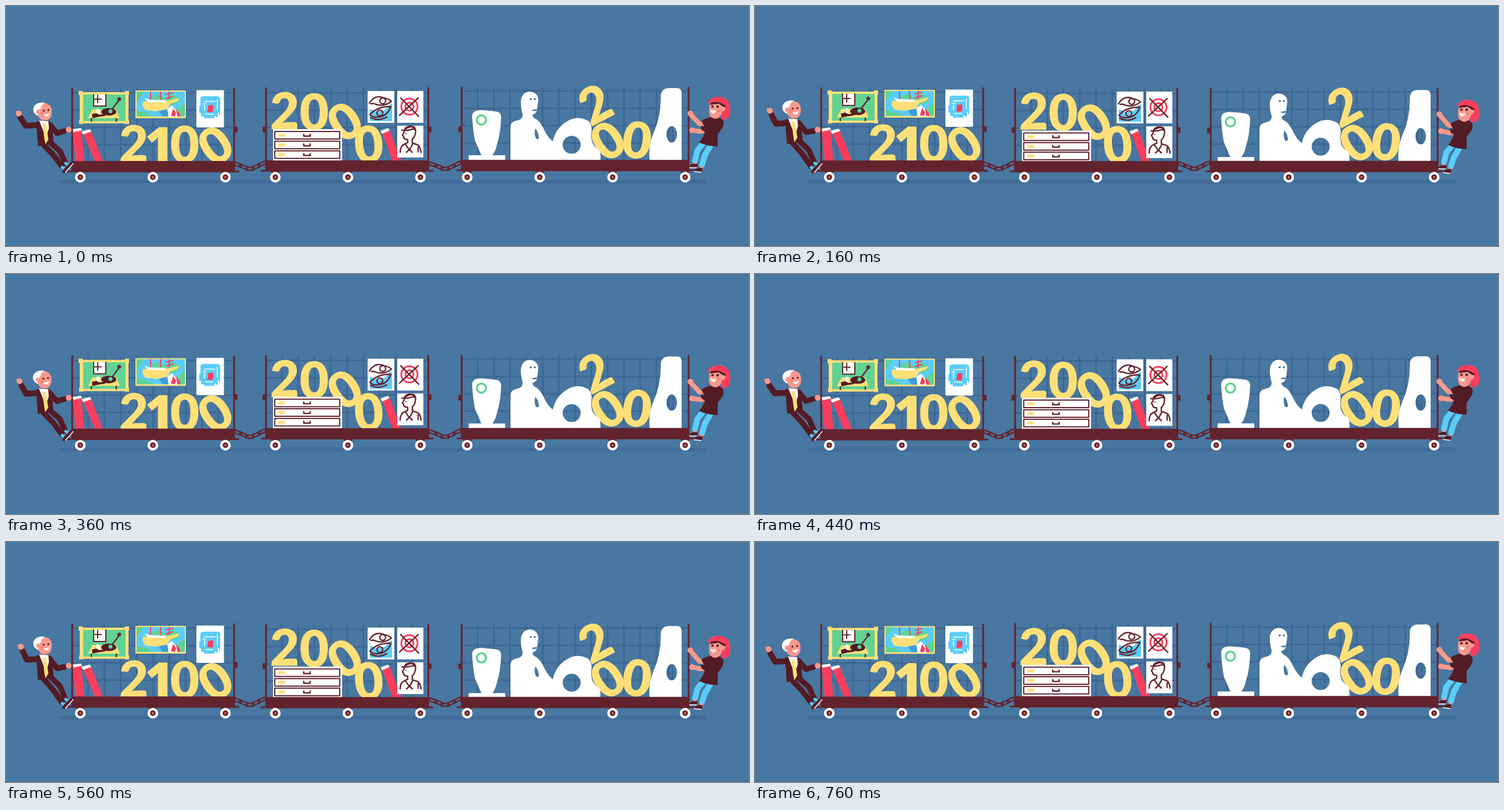
Recreate the animation shown at these times as an HTML page. Size 1280 by 415 pixels, loop 800 ms.

```html
<!DOCTYPE html>
<html lang="en">
<head>
<meta charset="utf-8">
<title>Museum train</title>
<style>
  html, body { margin: 0; width: 100%; height: 100%; overflow: hidden; background: #4877a1; }
  svg { display: block; width: 100%; height: 100%; }
  .digit { font: 900 87px Lato, sans-serif; fill: #ffe078; text-anchor: middle; }
  .plain { font: 800 84px "Open Sans", sans-serif; }
  .wine { fill: #63232d; } .ink { fill: #531b24; } .white { fill: #fff; } .red { fill: #f93e5d; }
  .cyan { fill: #5bcdf9; } .yellow { fill: #ffe078; } .green { fill: #60d394; } .skin { fill: #f8998c; }
  .line { fill: none; stroke: #63232d; stroke-width: 2.4; stroke-linecap: round; stroke-linejoin: round; }
  .thick { stroke-width: 3; } .thin { stroke-width: 2; }
  .limb { fill: none; stroke-linecap: round; stroke-linejoin: round; }
  .suit { stroke: #531b24; } .bare { stroke: #f8998c; } .jeans { stroke: #5bcdf9; }
  .grid { fill: none; stroke: #3e6894; stroke-width: 3; }
</style>
</head>
<body>
<svg viewBox="0 0 1280 415">
  <rect x="92" y="300.500" width="1115" height="6" rx="3" fill="#416b98"/>
  <g id="chains" class="line"></g>

  <g id="frame1"></g>
  <g id="load1">
    <g id="digits1"></g>
    <!-- still life -->
    <path class="yellow" d="M125 147h7v2h73v-2h7v7h-1v43h1v7h-7v-1h-72v1h-7v-7h1v-43h-2z"/>
    <path class="green" d="M133 153h73v46h-73z"/>
    <path class="white" d="M152 153h20v20h-20z"/>
    <path class="line thin" d="M151 153v20h21v-20M158 154v13M153 161h11"/>
    <path class="yellow" d="M149 179h41l6 15h-55z"/>
    <path class="line" d="M147 195v4M190 195v4M181 181l15-20"/>
    <circle class="line" cx="195" cy="161" r="2"/>
    <ellipse class="ink" cx="177" cy="183" rx="13" ry="6.5"/>
    <circle class="green" cx="180" cy="182" r="3.5"/>
    <path class="ink" d="M148 187l8-2 4 3 11-1v3l-13 2-9 2z"/>
    <path class="white" d="M156 178h5v8h-5z"/>
    <!-- harbour -->
    <path class="yellow" d="M223 146h87v48h-87z"/>
    <path class="cyan" d="M225 148h83v43h-83z"/>
    <path class="green" d="M225 148h12l-12 18zM248 161l13-9 14 8 13-8 13 10-9 8-13 2zM225 191v-9l14 1 15 8zM289 183l19-15v23h-12z"/>
    <path fill="#3f9add" d="M263 181l21-3-4 13h-10z"/>
    <path class="yellow" d="M236 165l17-2 24 1 22-5-4 6-12 4-5 9-18 4-20-2-5-8z"/>
    <path class="white" d="M238 159l9 3 29 1-2 4-29-1zM278 178l8-6 11 13-1 7h-16z"/>
    <path fill="none" stroke="#f93e5d" stroke-width="2" d="M249 148v13M266 148l1 14M281 148v14M275 153l13-3M275 160l13-4"/>
    <path class="red" d="M284 190l4-13 5 8-2 6zM293 178l7 9v4h-5z"/>
    <!-- abstract sheet -->
    <rect class="white" x="328" y="145.500" width="47.500" height="64.500" rx="1.500"/>
    <path class="cyan" d="M335 160q0-4 6-4h22q6 0 6 5v27h-2v-4h-2v8h-3v-2h-3v4h-18v-3h-5v-6h-3v-12h2z"/>
    <path fill="none" stroke="#fff" stroke-width="1.500" d="M341 165h20M339 169h6M364 161v18M342 171v10M343 187h14"/>
    <path class="red" d="M348 172l9-1v9l-2 4-9-1 2-5z"/>
    <!-- books -->
    <path class="red" d="M115 217l15-2 5 53h-15zM132 219l14-4 21 53h-14z"/>
    <path class="white" d="M115 213l14-2 2 4-15 3zM130 217l14-4 3 4-14 5z"/>
  </g>
  <g id="deck1"></g>

  <g id="frame2"></g>
  <g id="load2">
    <g id="digits2"></g>
    <path class="red" d="M648 219l13-5 20 54h-15z"/>
    <path class="white" d="M645 216l13-5 3 4-13 6zM623 147h46v55h-46zM674 147h45v55h-45zM674 207h45v55h-45z"/>
    <!-- eyes -->
    <path class="cyan" d="M627 178l12 5 14-3 7-9 5-2v30h-38z"/>
    <g class="line">
      <path d="M626 168q10-16 25-9 10 2 13 6-13 10-27 5-4-2-8-1M627 188q12-15 36-14-6 17-22 18-9 1-14-4zM628 193q14 7 28-1"/>
      <circle cx="649" cy="164" r="5"/><circle cx="644" cy="185" r="5"/>
    </g>
    <!-- crossed target -->
    <g fill="none" stroke="#f93e5d" stroke-width="3"><circle cx="695" cy="174" r="14"/><circle cx="695" cy="174" r="7"/></g>
    <path class="line" d="M680 159l31 32M710 159l-32 30"/>
    <!-- portrait sheet -->
    <path class="line" d="M679 253q0-12 9-15l4-2v-5q-7 0-7-5l-2-3 3-5v-3q6-7 17-6 4 5 2 12-1 6-5 9v7l9 3q5 3 6 13M682 215h10l12-3M686 215q2-7 11-7 6 1 7 6M688 239l7 10 6-11M690 253l5-5 5 5M710 244v8"/>
    <circle class="ink" cx="689" cy="221" r="1"/>
  </g>
  <g id="drawers"></g>
  <g id="deck2"></g>

  <g id="frame3"></g>
  <g id="load3">
    <g id="digits3"></g>
    <path class="white" d="M797 258h22l-11-25q-4-20-5-43 1-10 14-10 19 1 30 3 6 2 6 10-1 27-7 46-3 13-8 19h22v9h-63z"/>
    <circle cx="819" cy="197" r="8" fill="none" stroke="#60d394" stroke-width="3.500"/>
    <path class="white" fill-rule="evenodd" d="M869 267v-58q0-9 11-11 11-2 10-11-5-18-2-28 4-11 14-11 14 1 15 14l-2 17q-1 7-8 9 0 5 7 8 8 6 14 20 6 12 14 18 5-22 22-33 18-13 38-3 7 5 7 16-2 13 1 22 4 9 12 13 3 7 2 19zM959 240a15 15 0 1 0 31 0a15 15 0 1 0-31 0M912 212q-3 9 1 17 5 3 5-2-1-10-6-15z"/>
    <path fill="#4877a1" d="M905 180l10-2-1 3q-5 2-9-1z"/>
    <g fill="#3e6894"><circle cx="904" cy="161" r="1.700"/><circle cx="911" cy="161" r="1.700"/></g>
    <path class="white" fill-rule="evenodd" d="M1109 267q-3-25 6-46 14-31 13-66 1-13 15-13h13q8 0 8 9v116zM1138 222a9 14 0 1 0 18 0a9 14 0 1 0-18 0"/>
    <path fill="#3e6894" d="M1147 208a9 14 0 0 0 0 28q-7-14 0-28z"/>
  </g>
  <g id="deck3"></g>
  <g id="wheels"></g>

  <g id="man">
    <path id="manBackLeg" class="limb suit" stroke-width="9.500"/>
    <path id="manFrontLeg" class="limb suit" stroke-width="9.500"/>
    <path class="limb jeans" stroke-width="5" d="M97 279l5 3M103 272l4 2"/>
    <path class="ink" d="M97 286q3-6 7-8l5-6 5-3 2 3-14 17q-4 1-5-3z"/>
    <path d="M102 288l14-16" stroke="#fff" stroke-width="1.500"/>
    <path id="manHoldArm" class="limb suit" stroke-width="9.500"/>
    <circle class="skin" cx="108" cy="214" r="5"/>
    <path id="manWaveArm" class="limb suit" stroke-width="10"/>
    <g id="manHand"><circle class="skin" cx="22" cy="186" r="5"/><path class="limb bare" stroke-width="3" d="M19 184l-1-1"/></g>
    <g id="manBody">
      <path class="ink" d="M52 200q10-4 22-1 6 4 6 13l2 25q-12 4-27 5z"/>
      <path class="white" d="M57 198l16 1 1 12-5 17z"/>
      <path class="yellow" d="M63 203l6 1 4 27-5 8-2-10z"/>
    </g>
    <g id="manHead">
      <ellipse class="white" cx="61" cy="179" rx="14" ry="12"/>
      <path class="skin" d="M52 182q1-4 6-5-1-8 8-9 13 1 13 15 0 14-12 15-10 0-12-11-4-1-3-5z"/>
      <path class="white" d="M56 171q3-5 11-4-6 4-7 9-2 5-5 3zM65 187q6 1 10-2-1 6-5 6-4 0-5-4z"/>
      <circle class="ink" cx="65" cy="181" r="1.700"/><circle class="ink" cx="73" cy="180" r="1.700"/>
      <circle cx="62" cy="186" r="2.500" fill="#f47e79"/>
    </g>
  </g>

  <g id="woman">
    <path id="womanBackLeg" class="limb jeans" stroke-width="10"/>
    <path id="womanFrontLeg" class="limb jeans" stroke-width="10"/>
    <g id="womanFeet">
      <path class="limb bare" stroke-width="5" d="M1187 272v2M1198 279v2"/>
      <path class="ink" d="M1177 277q5-5 14-4v6l-14 1zM1185 284q6-5 15-4l-1 7-14-1z"/>
      <path d="M1177 279.500h13M1185 286l13 1.500" stroke="#fff" stroke-width="1.500"/>
    </g>
    <path id="womanHighArm" class="limb bare" stroke-width="8"/>
    <path id="womanLowArm" class="limb bare" stroke-width="8"/>
    <g id="womanHands" class="skin"><circle cx="1179" cy="186" r="5"/><circle cx="1182" cy="215" r="5"/></g>
    <g id="womanBody">
      <path class="limb bare" stroke-width="9" d="M1222 187v8"/>
      <path class="ink" d="M1198 199q8-6 19-7 12-1 18 5 3 7-1 14l-8 11 0 21q-16 0-32-7 8-10 10-18l-6-4-1-7 6 2z"/>
    </g>
    <g id="womanHead">
      <path class="red" d="M1212 166q5-9 17-9 15 1 18 14 2 13-1 20-4 6-13 5l-3-24z"/>
      <path class="skin" d="M1212 168q8-6 19 0 4 2 4 6 5-1 4 4-1 4-5 4-3 13-13 13-10-2-10-13z"/>
      <path class="ink" d="M1213 168q9-5 20-1 7 3 7 8l-5-1-7-5-8 1-7 1z"/>
      <circle class="ink" cx="1217" cy="174" r="2"/><circle class="ink" cx="1226" cy="174" r="2.200"/>
      <path class="white" d="M1214 179q5 3 9 1-1 6-5 6-4-2-4-7z"/>
      <circle cx="1228" cy="181" r="2.500" fill="#f47e79"/>
      <path class="red" d="M1209 166q6-9 17-9 12 1 16 11l-5 3q-10-8-27-3z"/>
    </g>
  </g>
</svg>
<script>
const $ = id => document.getElementById(id);
const fill = (id, items) => { $(id).innerHTML = items.join(''); };
const range = (count, make) => Array.from({ length: count }, (_, i) => make(i));

const carts = [
  { left: 114, right: 393, deckY: 268, gridY: 150, knobs: [396], wheels: [128, 253, 378] },
  { left: 448, right: 727.5, deckY: 267, gridY: 150, knobs: [445, 730], wheels: [464, 589, 714] },
  { left: 785, right: 1176, deckY: 266, gridY: 147, knobs: [782], wheels: [794.5, 919.5, 1045, 1170] }
];

carts.forEach(({ left, right, deckY, gridY, knobs }, i) => {
  const top = deckY - 125, width = right - left;
  const columns = range(Math.floor((width - 5) / 28), n => `M${left + 27.5 + n * 28} ${top}V${deckY}`);
  const rows = range(4, n => `M${left} ${gridY + n * 30}H${right}`);
  fill(`frame${i + 1}`, [
    `<path class="grid" d="${columns.join('')}${rows.join('')}"/>`,
    `<path class="line thick" d="M${left} ${top}V${deckY}M${right} ${top}V${deckY}"/>`,
    ...knobs.map(x => `<rect class="wine" x="${x - 3}" y="208.500" width="6" height="10" rx="1.500"/>`)
  ]);
  fill(`deck${i + 1}`, [
    `<rect class="wine" x="${left - 1.5}" y="${deckY}" width="${width + 3}" height="19"/>`,
    `<rect class="wine" x="${left - 9}" y="${deckY + 16.5}" width="${width + 18}" height="3" rx="1.500"/>`
  ]);
});

fill('wheels', carts.flatMap(cart => cart.wheels).map(x =>
  `<path class="wine" d="M${x - 8} 286h16l-3 5h-10z"/><circle class="white" cx="${x}" cy="296" r="9.200"/>
   <circle class="wine" cx="${x}" cy="296" r="4.800"/><circle class="skin" cx="${x}" cy="296" r="1.500"/>`));

const links = [[-21, 274, 20], [-11, 278, 22], [0, 281.5, 0], [11, 278, -22], [21, 273, -25]];
fill('chains', [420, 756.5].flatMap(x => links.map(([dx, y, angle]) =>
  `<rect x="-7" y="-2.500" width="14" height="5" rx="2.500" transform="translate(${x + dx} ${y}) rotate(${angle})"/>`)));

const digit = (char, x, y, angle = 0, style = '') =>
  `<text class="digit ${style}" dy=".36em" transform="translate(${x} ${y}) rotate(${angle})">${char}</text>`;
fill('digits1', [digit(2, 220, 239), digit(1, 264, 239, 0, 'plain'), digit(0, 308, 240), digit(0, 361, 241, -34)]);
fill('digits2', [digit(2, 480, 182), digit(0, 531, 184), digit(0, 584, 200, -34), digit(0, 625, 239, -5)]);
fill('digits3', [digit(2, 1015, 170, -28), digit(0, 1037, 233, -34), digit(0, 1087, 232, 8)]);

fill('drawers', ['<path class="white" d="M460 213h119v57H460z"/>', ...range(3, i =>
  `<g transform="translate(0 ${i * 16.7})">
  <path class="line thin" d="M463 217h112v13H463z"/>
  <rect class="yellow" x="469" y="221" width="12" height="5" rx="1"/>
  <path class="line" d="M513 222v3h11v-3"/></g>`)]);

// Vertical or horizontal sway, measured from the pose at time zero.
const wave = (time, peak, amplitude) => {
  const at = t => Math.cos((t - peak) / 400 * 2 * Math.PI);
  return amplitude * (at(time) - at(0));
};
const move = (id, x, y) => $(id).setAttribute('transform', `translate(${x} ${y})`);
const limb = (id, ...points) => $(id).setAttribute('d', 'M' + points.map(p => p.join(' ')).join('L'));

function draw(time) {
  const bounce = [[50, 1.1, 1.1], [125, 0.9, 0.9], [205, 1, 1.9]];
  bounce.forEach(([peak, deck, load], i) => {
    move(`frame${i + 1}`, 0, wave(time, peak, deck));
    move(`deck${i + 1}`, 0, wave(time, peak, deck));
    move(`load${i + 1}`, 0, wave(time, peak, load));
  });
  move('drawers', 0, wave(time, 140, 1.6));

  const manX = wave(time, 80, 1), manY = wave(time, 380, 1.8);
  const handX = wave(time, 235, 3), handY = wave(time, 0, 2.6);
  move('manHead', manX, manY);
  move('manBody', manX / 2, manY);
  move('manHand', handX, handY);
  limb('manWaveArm', [56, 206 + manY], [34 + handX / 2, 207 + manY], [25 + handX, 193 + handY]);
  limb('manHoldArm', [75 + manX / 2, 205 + manY], [88, 220 + manY / 2], [101, 216]);
  limb('manBackLeg', [75, 235 + manY], [93, 251 + manY / 2], [102, 271]);
  limb('manFrontLeg', [62, 237 + manY], [82, 258 + manY / 2], [96, 277]);

  const sway = wave(time, 215, 3.2), grip = sway * 0.25, step = sway * 0.4;
  move('womanHead', 0, sway);
  move('womanBody', 0, sway * 0.85);
  move('womanHands', 0, grip);
  move('womanFeet', 0, step);
  limb('womanHighArm', [1206, 203 + sway * 0.85], [1195, 204 + sway * 0.5], [1181, 189 + grip]);
  limb('womanLowArm', [1207, 214 + sway * 0.85], [1197, 217 + sway * 0.5], [1183, 215 + grip]);
  limb('womanBackLeg', [1201, 237 + sway * 0.8], [1191, 250 + sway * 0.7], [1187, 268 + step]);
  limb('womanFrontLeg', [1215, 239 + sway * 0.8], [1204, 258 + sway * 0.7], [1199, 275 + step]);
}

function tick(now) {
  draw(Math.floor(now % 800 / 40) * 40);
  requestAnimationFrame(tick);
}
draw(0);
requestAnimationFrame(tick);
</script>
</body>
</html>
```
